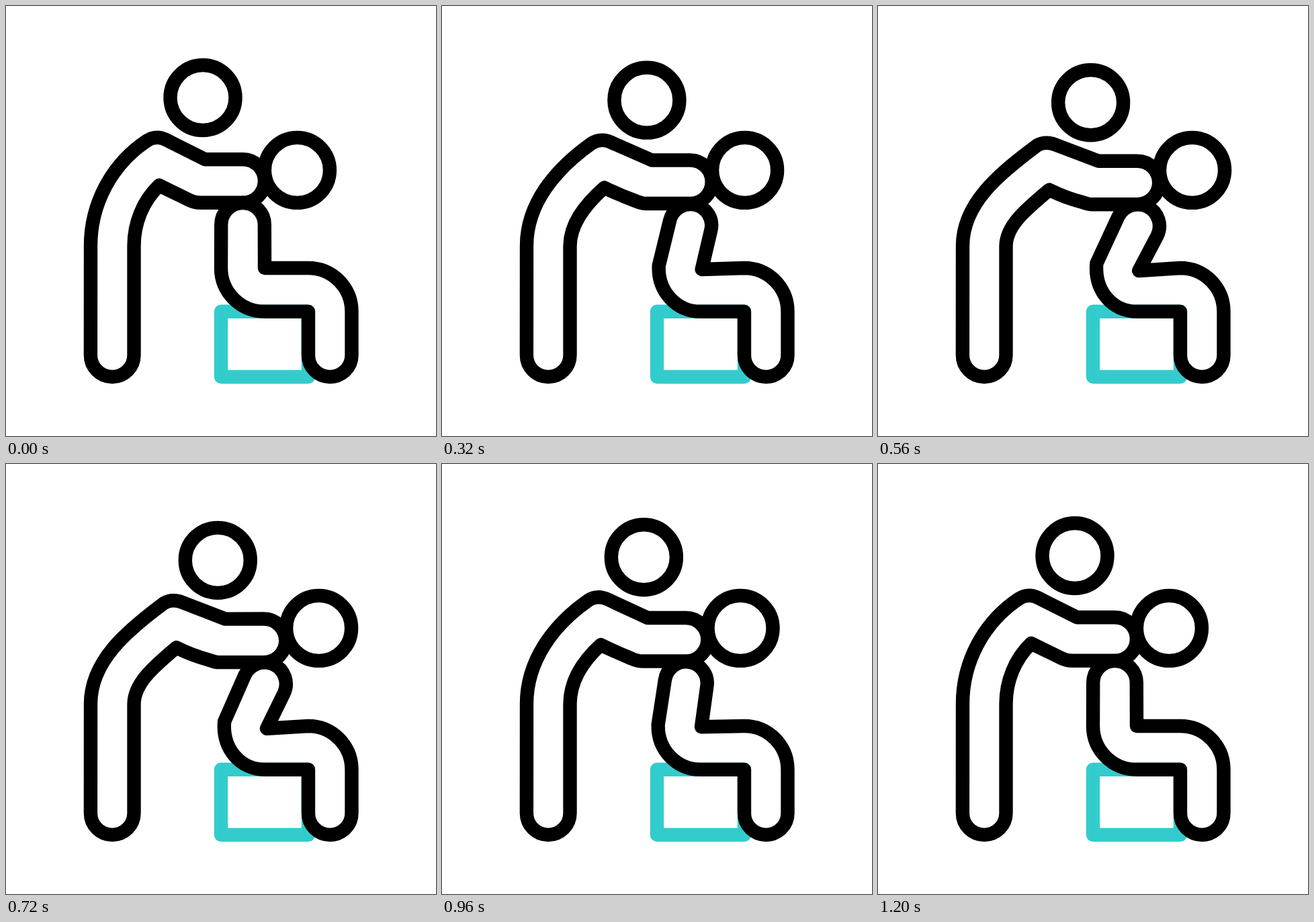
Write an HTML page that moves like this. It is 640 by 640 pixels and loops after 1.24 s.

```html
<!DOCTYPE html>
<html lang="en">
<head>
<meta charset="utf-8">
<title>Massage</title>
<style>
  html, body { margin: 0; width: 100%; height: 100%; overflow: hidden; background: #fff; }
  svg { display: block; width: 100%; height: 100%; }
</style>
</head>
<body>
<svg viewBox="0 0 640 640" fill="none" stroke="#000" stroke-width="20.4" stroke-linejoin="round">
  <rect x="320" y="454.8" width="130" height="97.2" stroke="#33cccc"/>
  <path id="sitter"/>
  <path id="helper"/>
  <circle id="sitterHead" r="48.5"/>
  <circle id="helperHead" r="48.5"/>
</svg>
<script>
const LOOP = 1240, STEP = 40;
const START = 40, PEAK = 600, END = 1200;
const R = 32.3;
const $ = id => document.getElementById(id);
const lerp = (a, b, p) => a + (b - a) * p;

// Half circle, clockwise; at 0 degrees it runs from left over the top to the right.
function cap(cx, cy, deg) {
  const a = deg * Math.PI / 180, c = Math.cos(a), s = Math.sin(a), k = 0.5523;
  const pts = [[-1, 0], [-1, -k], [-k, -1], [0, -1], [k, -1], [1, -k], [1, 0]]
    .map(([x, y]) => (cx + R * (x * c - y * s)).toFixed(3) + ',' + (cy + R * (x * s + y * c)).toFixed(3));
  return `${pts[0]} C ${pts.slice(1).join(' ')}`;
}

const sitterLegs = 'C 485.9,390 514.5,419 514.5,455 L ' + cap(482.2, 519.7, 180) +
  ' L 449.9,454.8 L 385,454.8';
const sitter = [
  `M ${cap(352.5, 325.3, 0)} L 385,390 L 450,390 ${sitterLegs} C 349,454.8 320,425.9 320,390 Z`,
  `M ${cap(386.9, 327.6, 26.5)} L 388.2,394 L 450,390 ${sitterLegs} C 349,454.8 322,424 325.4,383 Z`
];

const helperFoot = 'L ' + cap(158.2, 519.7, 180) + ' Z';
const helper = [
  `M 126,357 C 126,294.5 157.1,235.9 209,201 C 218.3,194.7 227.9,194.1 238,199
   L 296,228.2 L ${cap(352.6, 260.5, 90)} L 289,292.8 C 283,292.8 278,291.4 272,288.5
   C 257.3,281.3 242.7,274.2 228,267 C 203.6,290.3 190.5,323.2 190.5,357 ${helperFoot}`,
  `M 126,357 C 126,294 180,250 237,207.5 C 246,202.5 256,202.5 267,207.6
   L 328.4,230.8 L ${cap(386.1, 263, 90)} L 319,295.3 C 314,295.3 309,293.6 304,291.8
   C 289,288 270,281 255.2,273.6 C 219,304 191,327 190.5,357 ${helperFoot}`
];

const NUMBER = /-?\d+(?:\.\d+)?/g;

function morph([from, to], p) {
  const ends = to.match(NUMBER);
  let i = 0;
  return from.replace(NUMBER, n => lerp(+n, +ends[i++], p).toFixed(2));
}

// Cubic ease with control points (.5, 0) and (.5, 1).
function ease(x) {
  x = Math.min(1, Math.max(0, x));
  let lo = 0, hi = 1;
  for (let i = 0; i < 24; i++) {
    const u = (lo + hi) / 2;
    if (1.5 * u - 1.5 * u * u + u * u * u < x) lo = u; else hi = u;
  }
  return lo * lo * (3 - 2 * lo);
}

function leanAt(t) {
  return t <= PEAK
    ? ease((t - START) / (PEAK - START))
    : 1 - ease((t - PEAK) / (END - PEAK));
}

function moveTo(node, x, y) {
  node.setAttribute('cx', x);
  node.setAttribute('cy', y);
}

function draw(ms) {
  const t = Math.floor((ms % LOOP) / STEP) * STEP;
  const p = leanAt(t);
  $('sitter').setAttribute('d', morph(sitter, p));
  $('helper').setAttribute('d', morph(helper, p));
  moveTo($('sitterHead'), lerp(433.4, 467.8, p), 244.4);
  moveTo($('helperHead'), lerp(293, 316.8, p), lerp(136.5, 143.8, p));
}

let origin = null;
function tick(now) {
  if (origin === null) origin = now;
  draw(Math.max(0, now - origin));
  requestAnimationFrame(tick);
}
draw(0);
requestAnimationFrame(tick);
</script>
</body>
</html>
```
